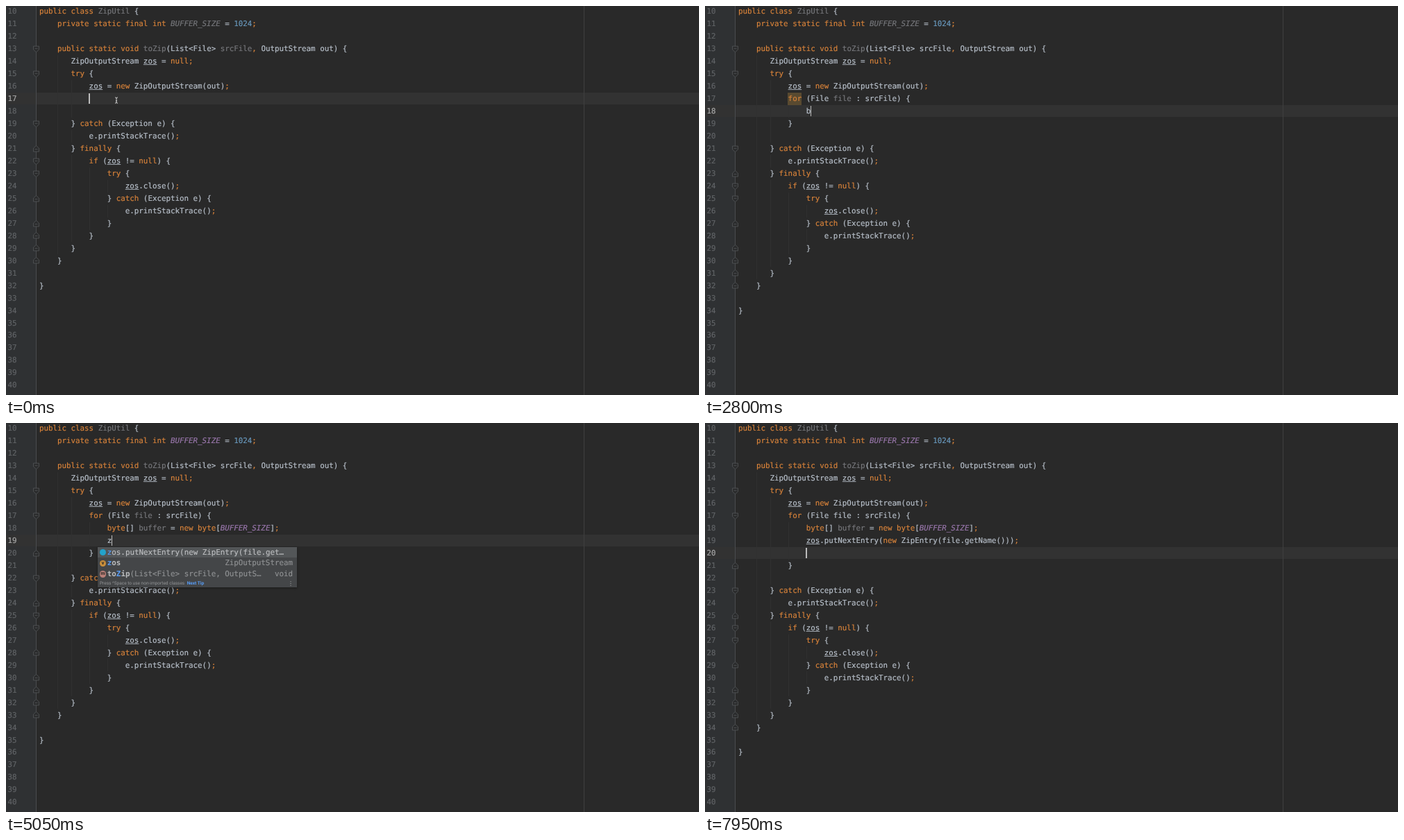
Recreate the animation shown at these times as an HTML page. Size 998x561 px, loop 8 s.

```html
<!DOCTYPE html>
<html lang="en">
<head>
<meta charset="utf-8">
<title>Editor</title>
<style>
html, body { margin: 0; width: 100%; height: 100%; overflow: hidden; background: #292929; }
#stage {
  position: relative; width: 998px; height: 561px; overflow: hidden; background: #292929;
  font: 400 10.83px/17.97px "DejaVu Sans Mono", "Noto Sans Mono", monospace;
  color: #b7bfc9; white-space: pre; text-rendering: geometricPrecision;
  -webkit-text-stroke: .2px;
}
#stage div, #stage span, #stage svg { position: absolute; }
#stage > span, #stage > .num { margin-top: .25px; }
.gutter { left: 0; top: 0; width: 43px; height: 561px; background: #2f3133; }
.edge { left: 43px; top: 0; width: 1px; height: 561px; background: #4a4c4e; }
.margin { left: 832px; top: 0; width: 1px; height: 561px; background: #3f3f3f; }
.row { left: 0; width: 998px; height: 17.2px; background: #323232; }
.guide { width: 1px; height: 18px; background: #303030; }
.num { left: 0; width: 15.5px; text-align: right; color: #606366; }
.num.on { color: #a8a8a8; }
.kw, .sep { color: #d5813a; }
.lit { color: #6897bb; }
.dim { color: #75767a; }
.const { color: #9876aa; font-style: italic; }
.const.dim { color: #75767a; }
.link { text-decoration: underline .5px #a0a7af; text-underline-offset: 1.2px; }
.mark { width: 20px; height: 17.97px; background: #594a30; }
.caret { width: 1.2px; height: 15px; background: #bcbcbc; }
.pop { width: 287px; background: #444648; color: #bbbdbf; box-shadow: 0 1px 3px #0006; }
.item { left: 0; width: 287px; height: 15.75px; line-height: 15.75px; }
.item.sel { background: #535658; }
.item.sel.blue { width: 314px; background: #0e3358; color: #c6cacf; }
.item span { left: 13.8px; }
.item b { font-weight: 700; -webkit-text-stroke: 0; }
.item i { font-style: normal; color: #8e9092; }
.item em { font-style: normal; color: #589df6; }
#stage .item .type { left: auto; right: 6px; color: #8e9092; }
#stage .item .dot {
  left: 2.8px; top: 3.2px; width: 9.4px; height: 9.4px; border-radius: 50%;
  font: 600 7px/8.6px Roboto, sans-serif; text-align: center; color: #3a3530;
}
.hint {
  left: 3px; width: 284px; height: 11px; color: #939597;
  font: 400 6.5px/11px Roboto, sans-serif; -webkit-text-stroke: 0;
}
.hint b { margin-left: 3.5px; color: #589df6; font-weight: 600; }
#stage .hint span { right: 5px; font-size: 8px; color: #c0c0c0; }
</style>
</head>
<body>
<div id="stage"></div>
<script>
const stage = document.getElementById('stage');
const CW = 6.52, LH = 17.97, LEFT = 47.9, FIRST = 10, LOOP = 8000;
const colX = c => LEFT + c * CW;
const rowY = r => 8 + (r - .5) * LH;
const pad = (n, s) => ' '.repeat(n) + s;
const esc = s => s.replace(/&/g, '&amp;').replace(/</g, '&lt;');
const box = (cls, x, y, html = '') => `<div class="${cls}" style="left:${x}px;top:${y}px">${html}</div>`;

// "~" marks an unused name, "^" a reassigned variable.
const TOKEN = /[~^]\w+|\w+|[;,]|\s+|[^\w\s~^;,]+/g;
const KEYWORD = /^(public|class|private|static|final|int|void|null|try|new|catch|finally|if|for|byte)$/;

function tokenClass(s, used) {
  if (s[0] === '~') return 'dim';
  if (s[0] === '^') return 'link';
  if (s === 'BUFFER_SIZE') return used ? 'const' : 'const dim';
  if (/^\d/.test(s)) return 'lit';
  if (/[;,]/.test(s)) return 'sep';
  return KEYWORD.test(s) ? 'kw' : '';
}

function codeLine(text, y, used) {
  let col = 0, out = '';
  for (const tok of text.match(TOKEN) || []) {
    const s = tok.replace(/[~^]/, '');
    if (s.trim()) out += `<span class="${tokenClass(tok, used)}" style="left:${colX(col)}px;top:${y}px">${esc(s)}</span>`;
    col += s.length;
  }
  return out;
}

const program = s => [
  'public class ~ZipUtil {',
  pad(4, 'private static final int BUFFER_SIZE = 1024;'),
  '',
  pad(4, `public static void ~toZip(List<File> ${s.src ? '' : '~'}srcFile, OutputStream out) {`),
  pad(7, 'ZipOutputStream ^zos = null;'),
  pad(7, 'try {'),
  pad(11, '^zos = new ZipOutputStream(out);'),
  ...s.body,
  '',
  pad(7, '} catch (Exception e) {'),
  pad(11, 'e.printStackTrace();'),
  pad(7, '} finally {'),
  pad(11, 'if (^zos != null) {'),
  pad(15, 'try {'),
  pad(19, '^zos.close();'),
  pad(15, '} catch (Exception e) {'),
  pad(19, 'e.printStackTrace();'),
  pad(15, '}'), pad(11, '}'), pad(7, '}'), pad(4, '}'),
  '', '}'
];

function foldIcon(up, r) {
  return `<svg width="11" height="12" style="left:38px;top:${rowY(r) + 3}px" fill="#2b2c2d" stroke="#55575a" stroke-width=".8">
    <g transform="translate(5.5 6) scale(1 ${up ? -1 : 1})"><path d="M-4-4H4V1L0 4.6-4 1ZM-2-.6H2"/></g></svg>`;
}

// Completion popup rows
const dot = (color, ch = '') => `<span class="dot" style="background:${color}">${ch}</span>`;
const AI = dot('#23a3cc'), VAR = dot('#c98f3c', 'v'), METHOD = dot('#b97f78', 'm'), NONE = '';
const item = (icon, html, type = '') => ({ icon, html, type });
const word = (hit, rest) => item(NONE, `<b><em>${hit}</em>${rest}</b>`);
const ZOS = item(VAR, '<b><em>zo</em>s</b>', 'ZipOutputStream');

const popF = {
  items: [
    item(AI, '<em>f</em>or (File file : srcFile)', '…'),
    ...['or', 'inal', 'loat'].map(w => word('f', w)),
    item(NONE, '<b><em>f</em>ori</b>', 'Create iteration loop'),
    item(METHOD, '<em>f</em>inalize<i>()</i>', 'void'),
    ...['File', 'FileFilter', 'FileReader', 'FileWriter', 'FilterReader']
      .map(w => item(dot('#4d8fa8', 'c'), `<em>F</em>${w.slice(1)} <i>java.io</i>`))
  ],
  hint: 'Press ⏎ to insert, ⇥ to replace'
};
const popB = {
  items: [
    item(AI, '<em>b</em>yte[] buffer = new byte[BUFFER_SIZE]', '…'),
    item(AI, '<em>b</em>yte[]', 'Dulm'),
    ...['reak', 'oolean', 'yte'].map(w => word('b', w))
  ],
  hint: 'Press ⏎ to insert, ⇥ to replace'
};
const popZ = {
  items: [
    item(AI, '<em>z</em>os.putNextEntry(new ZipEntry(file.get…'),
    item(VAR, '<b><em>z</em>os</b>', 'ZipOutputStream'),
    item(METHOD, '<b>to<em>Z</em>ip</b><i>(List&lt;File> srcFile, OutputS…</i>', 'void')
  ],
  hint: 'Press ^Space to use non-imported classes'
};
const popZo = {
  items: [item(AI, '<em>zo</em>s.putNextEntry(new ZipEntry(file.get…'), ZOS],
  hint: 'Press ^. to choose the selected (or first) suggestion and insert a dot afterwards'
};
const popBlue = {
  ...popZo, blue: true,
  items: [item(AI, '<em>zo</em>s.putNextEntry(new ZipEntry(file.getName))'), ZOS]
};

function popup(p, x, y) {
  const rows = p.items.map((it, i) =>
    `<div class="item ${i ? '' : 'sel'} ${p.blue ? 'blue' : ''}" style="top:${i * 15.75}px">${it.icon}<span>${it.html}</span><span class="type">${it.type}</span></div>`);
  const h = p.items.length * 15.75;
  return `<div class="pop" style="left:${x}px;top:${y}px;height:${h + 11}px">${rows.join('')}` +
    `<div class="hint" style="top:${h}px">${p.hint}<b>Next Tip</b><span>⋮</span></div></div>`;
}

// Timeline: each step changes part of the editor state.
const FOR = pad(11, 'for (File ~file : srcFile)'), FOR_USED = FOR.replace('~', '');
const END = pad(11, '}');
const BUF = pad(15, 'byte[] ~buffer = new byte[BUFFER_SIZE]');
const PUT = pad(15, '^zos.putNextEntry(new ZipEntry(file.getName()))');
const inLoop = (...rows) => [FOR + ' {', ...rows, END];
const inUsedLoop = (...rows) => [FOR_USED + ' {', ...rows, END];

const steps = [
  [0, { body: [''], cur: 7, col: 11, caret: true, mouse: true, pop: null, src: false, used: false, mark: false, fold: false }],
  [50, { body: [pad(11, 'f')], col: 12, mouse: false }],
  [450, { pop: popF }],
  [800, { caret: false }],
  [1050, { caret: true }],
  [1300, { pop: null }],
  [1600, { body: [FOR], col: 36, src: true }],
  [1950, { body: inLoop(''), cur: 8, col: 15, mark: true }],
  [2300, { caret: false }],
  [2500, { caret: true }],
  [2650, { body: inLoop(pad(15, 'b')), col: 16 }],
  [2950, { pop: popB }],
  [3300, { caret: false }],
  [3650, { pop: null, caret: true }],
  [3800, { body: inLoop(BUF), col: 52, used: true, mark: false }],
  [4000, { body: inLoop(BUF + ';'), col: 53 }],
  [4200, { body: inLoop(BUF + ';', ''), cur: 9, col: 15, fold: true }],
  [4450, { body: inLoop(BUF + ';', pad(15, 'z')), col: 16 }],
  [4650, { pop: popZ }],
  [5300, { body: inLoop(BUF + ';', pad(15, 'zo')), col: 17 }],
  [5400, { pop: popZo }],
  [5700, { pop: popBlue }],
  [6200, { pop: null }],
  [6350, { body: inUsedLoop(BUF + ';', PUT), col: 61 }],
  [7050, { body: inUsedLoop(BUF + ';', PUT + ';'), col: 62 }],
  [7550, { body: inUsedLoop(BUF + ';', PUT + ';', ''), cur: 10, col: 15 }]
];
let acc = {};
const states = steps.map(([t, change]) => ({ t, ...(acc = { ...acc, ...change }) }));

function render(s) {
  const lines = program(s), indents = [];
  let under = '', over = '';
  lines.forEach((text, r) => {
    const y = rowY(r), code = text.trim(), inBody = r >= 7 && r < 7 + s.body.length;
    const closes = code[0] === '}', opens = code.endsWith('{');
    if (closes) indents.pop();
    for (const c of indents) if (c) under += box('guide', colX(c), y);
    if (opens) indents.push(text.search(/\S/));
    over += codeLine(text, y, s.used);
    const foldable = r > 0 && r < lines.length - 1 && (!inBody || s.fold);
    const outerCatch = text.startsWith(pad(7, '} catch'));
    if (foldable && (opens || closes)) over += foldIcon(closes && !outerCatch, r);
  });
  for (let r = 0; r < 31; r++) over += `<div class="num ${r === s.cur ? 'on' : ''}" style="top:${rowY(r)}px">${FIRST + r}</div>`;

  const y = rowY(s.cur), x = colX(s.col);
  if (s.caret) over += box('caret', x - .3, y + 1.3);
  if (s.mouse) over += `<svg width="8" height="10" style="left:155px;top:130.5px" fill="none" stroke="#ddd" stroke-width=".9">
    <path d="M2 .8Q4 .8 4 2.2Q4 .8 6 .8M4 2V8M2 9.2Q4 9.2 4 7.8Q4 9.2 6 9.2M3 5.8H5"/></svg>`;
  if (s.pop) over += popup(s.pop, colX(s.cur === 7 ? 11 : 15) - 13.7, y + LH);
  stage.innerHTML = '<div class="gutter"></div>' + box('row', 0, y + .4) + under +
    (s.mark ? box('mark', colX(11) - .2, rowY(7)) : '') +
    '<div class="edge"></div><div class="margin"></div>' + over;
}

let shown = null;
function tick() {
  const t = performance.now() % LOOP;
  const s = states.findLast(st => st.t <= t);
  if (s !== shown) render(shown = s);
  requestAnimationFrame(tick);
}
tick();
</script>
</body>
</html>
```
